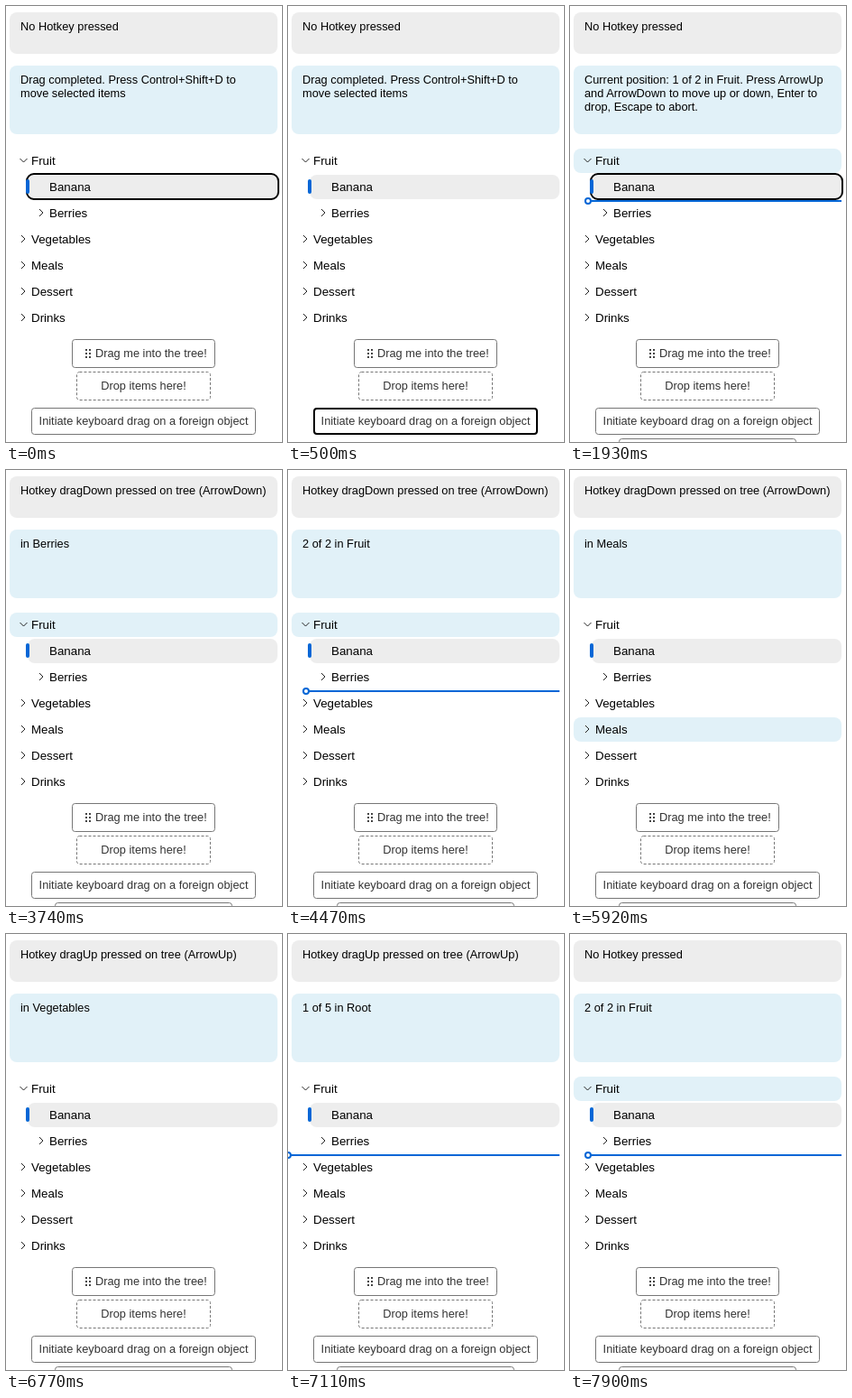
Animation of 306 by 483 pixels, one loop 8 s. Source, as an HTML page with a canvas:

```html
<!DOCTYPE html>
<html lang="en">
<head>
<meta charset="utf-8">
<title>Tree keyboard drag</title>
<style>
  html, body { margin: 0; width: 306px; height: 483px; overflow: hidden; background: #fff; }
  canvas, svg { position: absolute; left: 0; top: 0; }
  text { font-family: "Liberation Sans", Arial, sans-serif; font-size: 12.8px; fill: #000; }
  .tree text { font-size: 13.333px; }
  .buttons text { fill: #333; }
</style>
</head>
<body>
<canvas id="stage" width="306" height="483"></canvas>
<svg width="306" height="483">
  <text id="hotkey" x="16" y="27"></text>
  <text id="line0" x="16" y="86"></text>
  <text id="line1" x="16" y="101"></text>
  <text id="line2" x="16" y="116"></text>
  <g class="tree">
    <text x="28" y="176">Fruit</text>
    <text x="48" y="205">Banana</text>
    <text x="48" y="234">Berries</text>
    <text x="28" y="263">Vegetables</text>
    <text x="28" y="292">Meals</text>
    <text x="28" y="321">Dessert</text>
    <text x="28" y="350">Drinks</text>
  </g>
  <g class="buttons">
    <text x="99" y="389">Drag me into the tree!</text>
    <text x="152.5" y="425" text-anchor="middle">Drop items here!</text>
    <text x="36.6" y="464">Initiate keyboard drag on a foreign object</text>
  </g>
</svg>
<script>
const LOOP = 8000;
const GREY = '#ededed', PALE = '#e1f1f8', BLUE = '#0366d6', BORDER = '#767676';
const ctx = document.getElementById('stage').getContext('2d');
const FRUIT = 0, BERRIES = 2, VEGETABLES = 3, MEALS = 4, NONE = -1;

const idle = 'No Hotkey pressed';
const down = 'Hotkey dragDown pressed on tree (ArrowDown)';
const up = 'Hotkey dragUp pressed on tree (ArrowUp)';

// Each entry changes part of the state at its time; "drop" is [line x, row above the line].
const timeline = [
  [0, { hotkey: idle, focus: 'item', over: NONE, drop: null, dragging: false,
        info: ['Drag completed. Press Control+Shift+D to', 'move selected items'] }],
  [500, { focus: 'button' }],
  [1810, { focus: 'item', dragging: true, drop: [20, 1],
           info: ['Current position: 1 of 2 in Fruit. Press ArrowUp',
                  'and ArrowDown to move up or down, Enter to', 'drop, Escape to abort.'] }],
  [1930, { over: FRUIT }],
  [3740, { hotkey: down, focus: '', drop: null, info: ['in Berries'] }],
  [3800, { over: BERRIES }],
  [4350, { drop: [20, 2], info: ['2 of 2 in Fruit'] }],
  [4470, { over: FRUIT }],
  [4720, { drop: [0, 2], info: ['1 of 5 in Root'] }],
  [4840, { over: NONE }],
  [5150, { drop: null, info: ['in Vegetables'] }],
  [5210, { over: VEGETABLES }],
  [5320, { hotkey: idle }],
  [5500, { hotkey: down, drop: [0, 3], info: ['2 of 5 in Root'] }],
  [5560, { over: NONE }],
  [5870, { drop: null, info: ['in Meals'] }],
  [5920, { over: MEALS }],
  [6470, { hotkey: up, drop: [0, 3], info: ['2 of 5 in Root'] }],
  [6530, { over: NONE }],
  [6770, { drop: null, info: ['in Vegetables'] }],
  [6820, { over: VEGETABLES }],
  [7050, { drop: [0, 2], info: ['1 of 5 in Root'] }],
  [7110, { over: NONE }],
  [7480, { drop: [20, 2], info: ['2 of 2 in Fruit'] }],
  [7540, { over: FRUIT }],
  [7900, { hotkey: idle }]
];

function stateAt(t) {
  const state = {};
  for (const [time, change] of timeline) {
    if (time <= t) Object.assign(state, change);
  }
  return state;
}

const rowTop = row => 158 + 29 * row;

function box(x0, y0, x1, y1, r) {
  ctx.beginPath();
  ctx.roundRect(x0, y0, x1 - x0, y1 - y0, r);
}

function panel(x0, y0, x1, y1, r, color) {
  box(x0, y0, x1, y1, r);
  ctx.fillStyle = color;
  ctx.fill();
}

function frame(x0, y0, x1, y1, r, color, width = 1, dash = []) {
  const h = width / 2;
  box(x0 + h, y0 + h, x1 - h, y1 - h, r);
  ctx.strokeStyle = color;
  ctx.lineWidth = width;
  ctx.setLineDash(dash);
  ctx.stroke();
  ctx.setLineDash([]);
}

function chevron(x, row, open) {
  const y = rowTop(row) + 13;
  const pts = open ? [[-4, -2], [0, 2], [4, -2]] : [[-2, -4], [2, 0], [-2, 4]];
  ctx.beginPath();
  for (const [dx, dy] of pts) ctx.lineTo(x + dx, y + dy);
  ctx.strokeStyle = '#222';
  ctx.lineWidth = 1;
  ctx.stroke();
}

function dropLine([x, row]) {
  const y = rowTop(row) + 28;
  ctx.fillStyle = BLUE;
  ctx.fillRect(x, y, 301 - x, 2);
  ctx.beginPath();
  ctx.arc(x, y + 1, 3, 0, 2 * Math.PI);
  ctx.fillStyle = '#fff';
  ctx.fill();
  ctx.strokeStyle = BLUE;
  ctx.lineWidth = 2;
  ctx.stroke();
}

function drawTree(s) {
  if (s.over !== NONE) {
    const left = s.over === BERRIES ? 24 : 4;
    panel(left, rowTop(s.over), 301, rowTop(s.over) + 27, 8, PALE);
  }
  panel(24, 187, 301, 214, 8, GREY);
  if (s.focus === 'item') frame(22, 185, 303, 215, 8, '#000', 2);
  panel(22, 192, 26, 208, 2, BLUE);
  chevron(19.5, 0, true);
  chevron(39, 2);
  for (let row = 3; row <= 6; row++) chevron(19, row);
  if (s.drop) dropLine(s.drop);
}

function drawButtons(s) {
  frame(73, 369, 232, 401, 3, BORDER);
  ctx.fillStyle = '#444';
  for (let i = 0; i < 6; i++) ctx.fillRect(88 + 4 * (i % 2), 380 + 4 * (i >> 1), 2, 2);
  frame(78, 405, 227, 437, 3, BORDER, 1, [3, 2]);
  const focused = s.focus === 'button';
  frame(28, 445, 277, 475, 3, focused ? '#000' : BORDER, focused ? 2 : 1);
  if (s.dragging) frame(54, 479, 251, 509, 3, BORDER);
}

function setText(id, value) {
  const el = document.getElementById(id);
  if (el.textContent !== value) el.textContent = value;
}

function draw(t) {
  const s = stateAt(t);
  ctx.fillStyle = '#fff';
  ctx.fillRect(0, 0, 306, 483);
  panel(4, 7, 301, 53, 8, GREY);
  panel(4, 66, 301, 142, 8, PALE);
  drawTree(s);
  drawButtons(s);
  setText('hotkey', s.hotkey);
  for (let i = 0; i < 3; i++) setText('line' + i, s.info[i] || '');
}

const start = performance.now();
function tick() {
  draw((performance.now() - start) % LOOP);
  requestAnimationFrame(tick);
}
tick();
</script>
</body>
</html>
```
